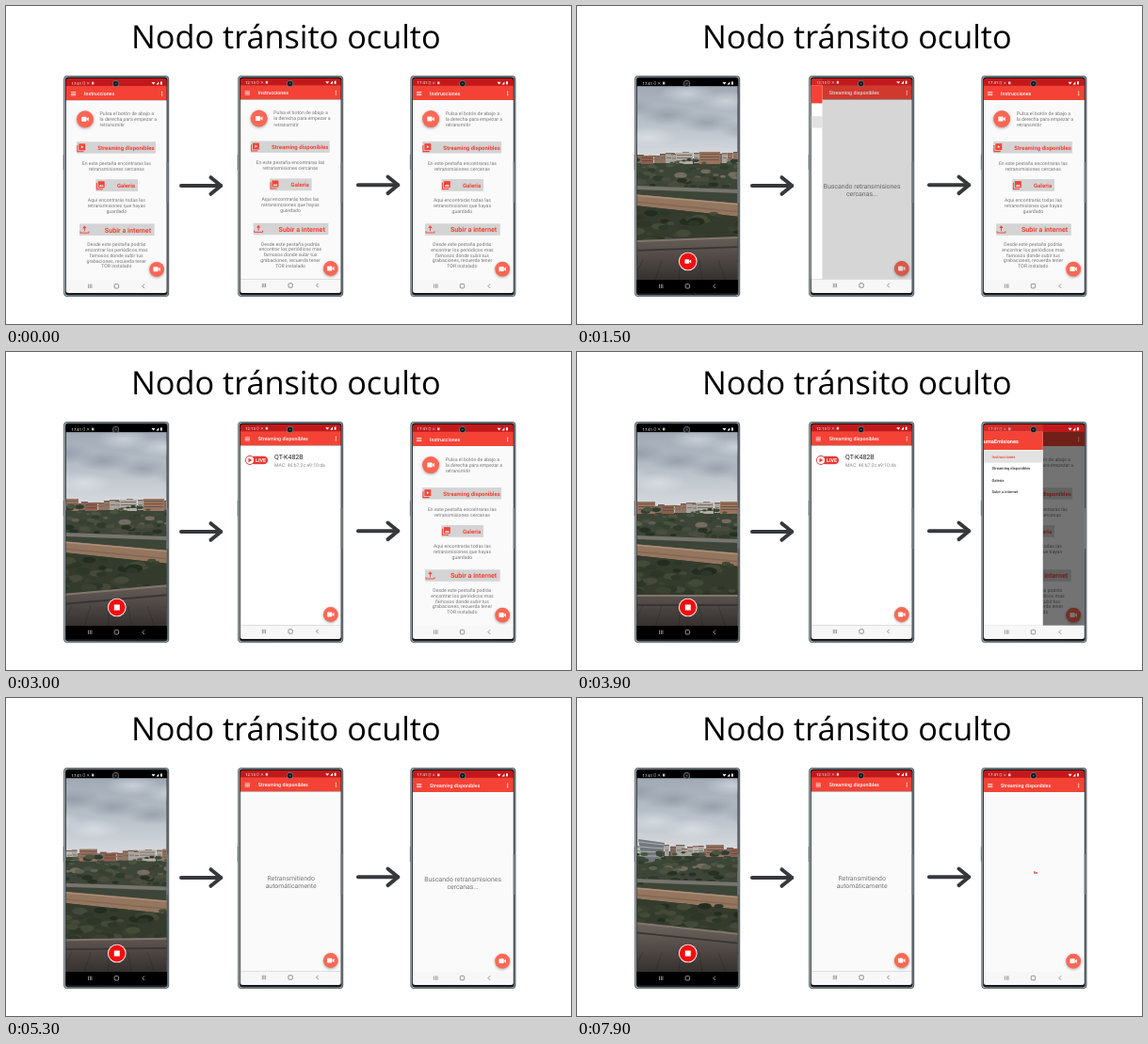
Animation, 600 px wide and 338 px high, one loop 8000 ms. Source, as an HTML page with a canvas:

```html
<!DOCTYPE html>
<html lang="es">
<head>
<meta charset="utf-8">
<title>Nodo tránsito oculto</title>
<style>
html, body { margin: 0; width: 100%; height: 100%; overflow: hidden; background: #fff; }
canvas { display: block; width: 600px; height: 338px; }
</style>
</head>
<body>
<canvas id="stage"></canvas>
<script>
const LOOP = 8000;
const RED = '#f44336', DARK = '#c3181b', GRAY = '#757575';
const APP = 'PlumaEmisiones', DEVICE = 'QT-K482B', MAC = 'MAC: 46:b7:2c:e9:10:da';
const canvas = document.getElementById('stage');
const c = canvas.getContext('2d');
const dpr = window.devicePixelRatio || 1;
canvas.width = 600 * dpr;
canvas.height = 338 * dpr;

const clamp = v => Math.max(0, Math.min(1, v));
const smooth = (t, a, b) => { const p = clamp((t - a) / (b - a)); return p * p * (3 - 2 * p); };

// Smooth interpolation through [time, value] pairs
function track(t, keys) {
  let v = keys[0][1];
  for (let i = 1; i < keys.length; i++) {
    v += (keys[i][1] - keys[i - 1][1]) * smooth(t, keys[i - 1][0], keys[i][0]);
  }
  return v;
}

function rng(seed) {
  return () => (seed = (seed * 16807) % 2147483647) / 2147483647;
}

function rect(x, y, w, h, fill) { c.fillStyle = fill; c.fillRect(x, y, w, h); }
function round(x, y, w, h, r, fill) {
  c.beginPath(); c.roundRect(x, y, w, h, r); c.fillStyle = fill; c.fill();
}
function disc(x, y, r, fill) {
  c.beginPath(); c.arc(x, y, r, 0, 7); c.fillStyle = fill; c.fill();
}
function poly(pts, fill) {
  c.beginPath();
  pts.forEach(p => c.lineTo(p[0], p[1]));
  c.closePath(); c.fillStyle = fill; c.fill();
}
function line(pts, color, width) {
  c.beginPath();
  pts.forEach(p => c.lineTo(p[0], p[1]));
  c.strokeStyle = color; c.lineWidth = width; c.stroke();
}
function text(s, x, y, size, color, weight = 400, align = 'left', family = 'Roboto') {
  c.font = `${weight} ${size}px ${family}, sans-serif`;
  c.textRendering = 'geometricPrecision';
  c.textAlign = align;
  c.fillStyle = color;
  c.fillText(s, x, y);
}
function lines(list, x, y, step, size, color, align) {
  list.forEach((s, i) => text(s, x, y + i * step, size, color, 400, align));
}
function vertical(y0, y1, ...colors) {
  const g = c.createLinearGradient(0, y0, 0, y1);
  colors.forEach((k, i) => g.addColorStop(i / (colors.length - 1), k));
  return g;
}

function camIcon(x, y, k = 1) {
  round(x - 3.7 * k, y - 2.5 * k, 5.2 * k, 5 * k, .7 * k, '#fff');
  poly([[x + 1.3 * k, y], [x + 3.7 * k, y - 2.3 * k], [x + 3.7 * k, y + 2.3 * k]], '#fff');
}
function fab(x, y, r) {
  c.save();
  c.shadowColor = 'rgba(0,0,0,.35)'; c.shadowBlur = 3 * dpr; c.shadowOffsetY = dpr;
  disc(x, y, r, '#fc6755');
  c.restore();
  camIcon(x, y);
}
function stackIcon(x, y, k, color, play) {
  line([[x - 4 * k, y - 2.4 * k], [x - 4 * k, y + 4 * k], [x + 2.4 * k, y + 4 * k]], color, k);
  rect(x - 2.6 * k, y - 4 * k, 6.6 * k, 6.6 * k, color);
  if (play) poly([[x - .3 * k, y - 2.3 * k], [x + 2.4 * k, y - .7 * k], [x - .3 * k, y + .9 * k]], '#ddd');
  else poly([[x - 1.8 * k, y + 1.5 * k], [x - .2 * k, y - .7 * k], [x + .9 * k, y + .5 * k], [x + 1.8 * k, y - .8 * k], [x + 3.2 * k, y + 1.5 * k]], '#ddd');
}
function uploadIcon(x, y, k, color) {
  line([[x - 4.5 * k, y + 2 * k], [x - 4.5 * k, y + 3.7 * k], [x + 4.5 * k, y + 3.7 * k], [x + 4.5 * k, y + 2 * k]], color, .9 * k);
  line([[x, y + 2 * k], [x, y - 2.5 * k]], color, .9 * k);
  poly([[x, y - 4 * k], [x + 2.2 * k, y - 1.2 * k], [x - 2.2 * k, y - 1.2 * k]], color);
}

function statusBar(clock, fill) {
  rect(63, 76, 109, 9.2, fill);
  text(clock, 69.5, 83.6, 4.3, '#fff');
  c.strokeStyle = 'rgba(255,255,255,.6)'; c.lineWidth = .5;
  c.strokeRect(81.8, 80.8, 2, 2.4);
  line([[86, 80.8], [88.4, 83.4]], '#ddd', .5);
  line([[88.4, 80.8], [86, 83.4]], '#ddd', .5);
  rect(91, 80.6, 2.4, 2.8, 'rgba(255,255,255,.75)');
  poly([[154.5, 81], [158.5, 81], [156.5, 83.6]], '#fff');
  poly([[159.5, 83.6], [162.3, 83.6], [162.3, 80.4]], '#fff');
  rect(164, 80.4, 1.8, 3.2, '#fff');
}
function navBar(bg, ink) {
  rect(63, 291, 109, 15, bg);
  for (let i = 0; i < 3; i++) rect(87.2 + i * 1.7, 295.6, .7, 4.4, ink);
  c.strokeStyle = ink; c.lineWidth = .8;
  c.beginPath(); c.roundRect(115.2, 295.6, 4.4, 4.4, 1); c.stroke();
  line([[147, 295.6], [144.8, 297.8], [147, 300]], ink, .8);
}
function appBar(title) {
  rect(63, 85, 109, 15.2, RED);
  for (let i = 0; i < 3; i++) {
    rect(69, 91.3 + i * 1.6, 5.2, .75, '#fff');
    disc(165.6, 91.3 + i * 1.8, .65, '#fff');
  }
  text(title, 83, 95, 5.3, '#fff', 500);
}

function page(fill) { rect(63, 100.2, 109, 191, fill); }

function instructions() {
  page('#fafafa');
  fab(84, 120.3, 9);
  lines(['Pulsa el botón de abajo a', 'la derecha para empezar a', 'retransmitir'], 99.6, 116, 6.2, 5.15, GRAY);
  rect(75, 144.3, 84, 12.4, '#d4d4d4');
  stackIcon(80, 150.6, 1.05, RED, true);
  text('Streaming disponibles', 97.2, 152.8, 6, RED, 700);
  lines(['En este pestaña encontraras las', 'retransmisiones cercanas'], 117.3, 169, 6, 5.15, GRAY, 'center');
  rect(95.3, 184.2, 44.7, 12.8, '#d4d4d4');
  stackIcon(100.5, 190.5, 1.05, RED, false);
  text('Galeria', 117.9, 192.8, 6, RED, 700);
  lines(['Aqui encontrarás todas las', 'retransmisiones que hayas', 'guardado'], 117.3, 208, 6, 5.15, GRAY, 'center');
  rect(78, 231.5, 79.7, 12.5, '#d4d4d4');
  uploadIcon(83.4, 237.5, 1, RED);
  text('Subir a internet', 104.8, 240.5, 7.15, RED, 700);
  lines(['Desde este pestaña podrás', 'encontrar los periódicos mas', 'famosos donde subir tus', 'grabaciones, recuerda tener', 'TOR instalado'], 117.3, 255.4, 5.75, 5.15, GRAY, 'center');
}
function message(a, b) {
  page('#fafafa');
  lines([a, b], 118, 194.8, 8.2, 6.9, GRAY, 'center');
}
function liveRow(dy) {
  page('#fff');
  const y = 115.8 + dy;
  round(75, y - 4.3, 18.4, 8.6, 4.3, '#e53935');
  disc(74.3, y, 5, '#e53935');
  disc(74.3, y, 4.1, '#fff');
  poly([[72.8, y - 2.2], [76.6, y], [72.8, y + 2.2]], '#e53935');
  text('LIVE', 80.4, y + 2.1, 5.4, '#fff', 700);
  text(DEVICE, 100.4, y - .9, 7, '#222');
  text(MAC, 100.4, y + 7.3, 5.1, '#888');
}
function loader() {
  page('#fafafa');
  rect(118, 184.5, 1.6, 2.4, RED);
  rect(120, 185.3, 1.8, 1.6, RED);
}

function drawer(open, selected) {
  if (open <= 0) return;
  rect(63, 85, 109, 206, `rgba(0,0,0,${.6 * open ** .75})`);
  c.save();
  c.translate(-73.5 * (1 - open), 0);
  rect(50, 76, 88, 9, 'rgba(244,67,54,.35)');
  rect(50, 85, 88, 206, '#fff');
  rect(50, 85, 88, 19.2, RED);
  text(APP, 70, 97, 5.6, '#fff', 700);
  ['Instrucciones', 'Streaming disponibles', 'Galeria', 'Subir a internet'].forEach((s, i) => {
    const y = 111.6 + i * 12.5, on = i === selected, ink = on ? RED : '#333';
    if (on) rect(50, y - 6.2, 88, 12.5, '#e2e2e2');
    if (i === 0) { disc(72.3, y, 2.9, ink); rect(71.9, y - 1.6, .8, 3.2, '#fff'); }
    else if (i === 3) uploadIcon(72.3, y, .55, ink);
    else stackIcon(72.3, y, .65, ink, i === 1);
    text(s, 83.7, y + 1.4, 4.1, ink, 500);
  });
  c.restore();
}

function cloud(x, y, rx, ry, rgb, alpha = .6) {
  c.save();
  c.translate(x, y); c.scale(rx, ry);
  const g = c.createRadialGradient(0, 0, 0, 0, 0, 1);
  g.addColorStop(0, `rgba(${rgb},${alpha})`); g.addColorStop(1, `rgba(${rgb},0)`);
  disc(0, 0, 1, g);
  c.restore();
}

// Random bushes inside a horizontal band
function shrubs(r, count, top, height, size, colors) {
  for (let i = 0; i < count; i++) {
    const s = size * (.5 + r());
    c.beginPath();
    c.ellipse(-80 + r() * 290, top + r() * height, s * 1.5, s * .7, 0, 0, 7);
    c.fillStyle = colors[Math.floor(r() * colors.length)];
    c.fill();
  }
}

function scenery(t) {
  const dx = track(t, [[600, 0], [1500, 0], [3000, 16], [3900, 22], [4700, 30], [6100, 45], [7900, 95]]);
  const hy = track(t, [[600, 163], [1500, 166], [3000, 167], [3900, 170], [4700, 172], [6100, 171], [7900, 167]]);
  rect(63, 85, 109, 206, vertical(85, hy, '#a0a9b4', '#b9c1ca', '#dadee1'));
  for (let i = 0; i < 12; i++) {
    cloud(-30 + i * 21 + dx * .5, 92 + (i * 31) % 54, 30, 11, i % 2 ? '235,239,243' : '125,134,147', .5);
  }
  c.save();
  c.translate(dx, hy);
  rect(-110, -4, 320, 140, '#3d4538');
  const r = rng(41);
  for (let x = -80; x < 190; x += 6) {
    const h = 2 + r() * 5, w = 4 + r() * 6;
    rect(x, -4 - h, w, h + 5, ['#8f7462', '#a8a39c', '#7f6b5f', '#bcb6ae'][Math.floor(r() * 4)]);
    rect(x, -4 - h, w, 1, '#755145');
    rect(x + 1, -2 - h * .5, w - 2, .7, '#66615e');
  }
  // Larger blocks on the skyline
  [[42, 19, 11, '#98735f'], [68, 13, 7, '#8d5f4e'], [105, 18, 10, '#b3aca4'], [130, 22, 11, '#9a735c']].forEach(([x, w, h, k]) => {
    rect(x, -h, w, h + 2, k);
    for (let j = 2; j < h; j += 3) rect(x + 1, -h + j, w - 2, .9, 'rgba(70,62,60,.6)');
  });
  poly([[-30, -17], [-2, -13], [-4, 5], [-25, 9]], '#71777c');
  for (let j = 0; j < 4; j++) line([[-29, -14 + j * 5], [-3, -11 + j * 4]], '#aeb1b3', 1);
  shrubs(r, 90, -3, 12, 2.4, ['#303c2e', '#3c4836', '#4b5541']);
  shrubs(r, 45, 9, 9, 3, ['#4b513f', '#746d5f', '#36412f', '#5d604f']);
  shrubs(r, 70, 17, 14, 2.8, ['#263124', '#303b2a', '#4a4c3d']);
  c.restore();

  c.save();
  c.translate(0, hy - 168);
  // Road, dirt strip and embankment
  poly([[60, 193], [174, 197], [174, 201], [60, 197]], '#77756d');
  poly([[60, 202], [174, 212], [174, 226], [60, 214]], '#94765f');
  line([[60, 203], [174, 213]], '#ab9079', 1.4);
  line([[60, 210], [174, 221]], '#836753', 1.4);
  poly([[60, 214], [174, 226], [174, 275], [60, 275]], '#343b2d');
  c.translate(dx * .6, 0);
  shrubs(rng(9), 110, 222, 34, 4, ['#232c20', '#2d3727', '#444a37', '#39412f']);
  c.restore();

  const left = track(t, [[1500, 250], [3000, 258], [3900, 259], [4700, 258], [6100, 256], [7900, 239]]);
  const right = track(t, [[1500, 246], [3000, 248], [3900, 259], [4700, 257], [6100, 254], [7900, 251]]);
  poly([[60, left], [174, right], [174, 292], [60, 292]], vertical(242, 291, '#6a615b', '#514a46', '#35312f'));
  line([[60, left], [174, right]], '#82766d', 2);
  line([[60, left + 10], [174, right + 10]], '#393533', 1.8);
  for (let i = 0; i < 6; i++) line([[70 + i * 20, 270], [58 + i * 25, 292]], 'rgba(20,18,18,.3)', .8);
}

function cameraView(t) {
  rect(63, 76, 109, 230, '#000');
  if (t > 680) {
    c.save();
    c.beginPath(); c.rect(63, 85, 109, 206); c.clip();
    c.globalAlpha = smooth(t, 680, 800);
    scenery(t);
    c.restore();
    disc(117.8, 271.5, 9.8, '#fff');
    disc(117.8, 271.5, 8.9, '#f20d10');
    if (t < 1900) camIcon(117.8, 271.5, .9);
    else rect(114.8, 268.5, 6, 6, '#fff');
  }
  statusBar('17:41', '#000');
  navBar('#000', '#bbb');
}

function appView(clock, title, body, open = 0, selected = 0) {
  statusBar(clock, DARK);
  appBar(title);
  body();
  fab(160.1, 279.8, 7.9);
  drawer(open, selected);
  navBar('#f7f7f7', '#777');
}

const HOME = 'Instrucciones', LIST = 'Streaming disponibles';
const searching = () => message('Buscando retransmisiones', 'cercanas...');

function screenA(t) {
  if (t < 600) appView('17:41', HOME, instructions);
  else cameraView(t);
}
function screenB(t) {
  const open = smooth(t, 500, 780) - smooth(t, 1300, 1567);
  const picked = t >= 1200;
  const body = !picked ? instructions : t < 2200 ? searching
    : t < 4200 ? () => liveRow(0) : () => message('Retransmitiendo', 'automáticamente');
  appView('12:13', picked ? LIST : HOME, body, open, picked ? 1 : 0);
}
function screenC(t) {
  const open = smooth(t, 3700, 3963) - smooth(t, 5000, 5270);
  const picked = t >= 4900;
  const body = !picked ? instructions : t < 5600 ? searching
    : t < 6900 ? () => liveRow(.6) : loader;
  appView('17:41', picked ? LIST : HOME, body, open, picked ? 1 : 0);
}

function phone(x, screenX, screenY, screen, t) {
  c.save();
  c.translate(x, 0);
  const g = c.createLinearGradient(61, 0, 173, 0);
  g.addColorStop(0, '#7b868b'); g.addColorStop(.03, '#c3cbce');
  g.addColorStop(.97, '#b3bcc0'); g.addColorStop(1, '#68747a');
  rect(60.6, 158, 1, 16, '#8a9296');
  round(61.2, 74, 112, 235, 4, '#4b555a');
  round(61.9, 74.7, 110.6, 233.6, 3.6, g);
  round(63, 75.6, 108.4, 231.8, 3, '#171a1c');
  c.save();
  c.beginPath(); c.roundRect(63.8, 77, 106.8, 228, 2.5); c.clip();
  c.translate(screenX - x, screenY);
  screen(t);
  c.restore();
  rect(170.6, 166, 2, 43, '#72797d');
  disc(116.6, 82.5, 3.5, '#777d82');
  disc(116.6, 82.5, 2.8, '#15171a');
  disc(116.6, 82.5, 1.1, '#465264');
  c.restore();
}

function arrow(x, y) {
  c.lineCap = c.lineJoin = 'round';
  line([[x + 2, y], [x + 44, y]], '#37383b', 4);
  line([[x + 33.5, y - 8.8], [x + 44.3, y], [x + 33.5, y + 8.8]], '#37383b', 4);
  c.lineCap = 'butt'; c.lineJoin = 'miter';
}

function draw(t) {
  c.setTransform(dpr, 0, 0, dpr, 0, 0);
  rect(0, 0, 600, 338, '#fff');
  text('Nodo tránsito oculto', 297.3, 45.3, 34.25, '#000', 400, 'center', '"Open Sans"');
  phone(0, 0, 0, screenA, t);
  phone(185, 184.7, -.8, screenB, t);
  phone(368.2, 367.1, -.2, screenC, t);
  arrow(184, 191);
  arrow(372, 190.3);
}

const start = performance.now();
function tick(now) {
  draw(Math.max(0, now - start) % LOOP);
  requestAnimationFrame(tick);
}
draw(0);
requestAnimationFrame(tick);
</script>
</body>
</html>
```
